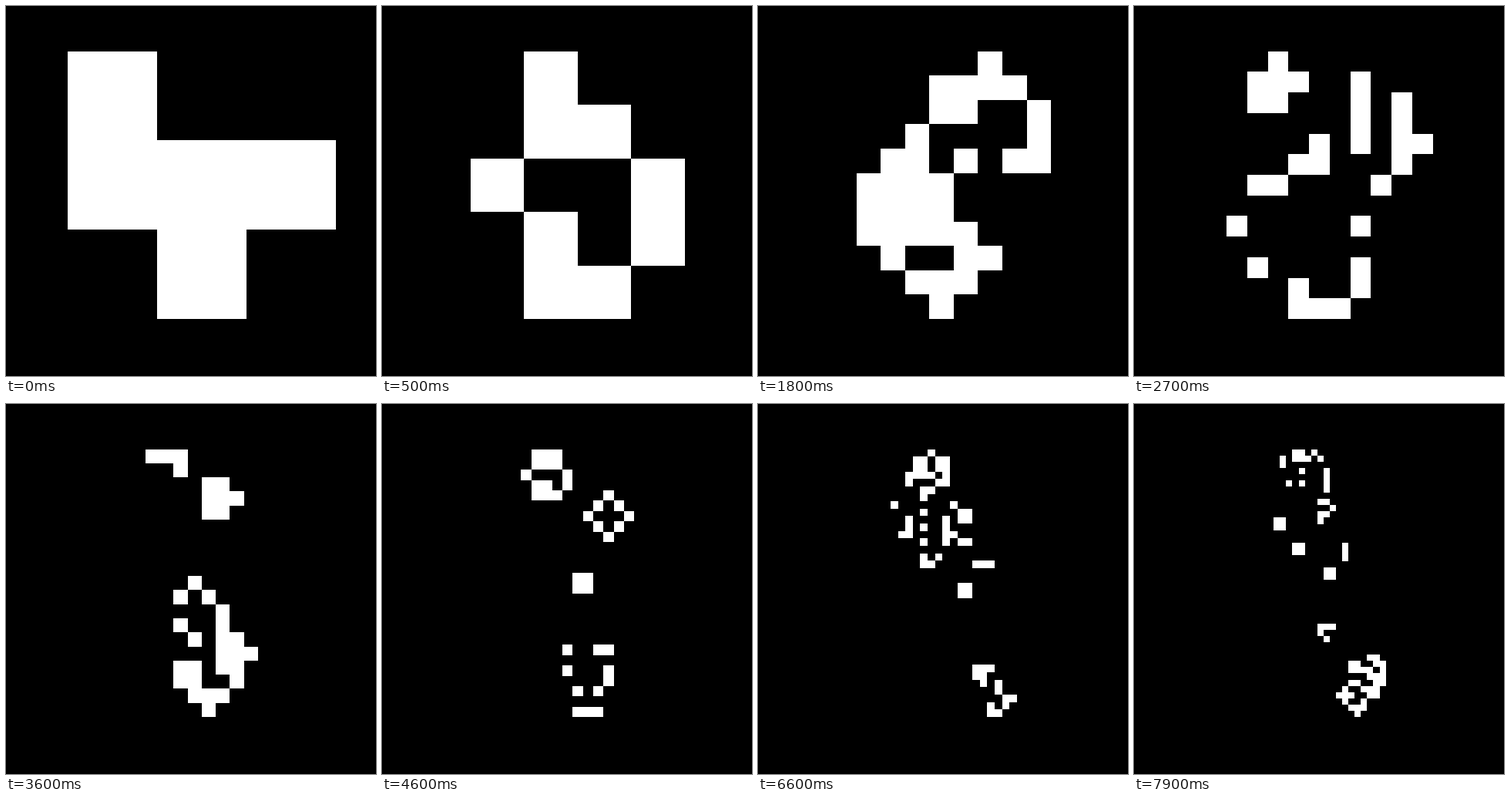
Recreate the animation shown at these times as an HTML page with a canvas. Size 480 px wide and 480 px high, loop 8000 ms.

```html
<!DOCTYPE html>
<html lang="en">
<head>
<meta charset="utf-8">
<title>Game of Life</title>
<style>
  html, body { margin: 0; width: 100%; height: 100%; overflow: hidden; background: #000; }
  canvas { display: block; width: 480px; height: 480px; }
</style>
</head>
<body>
<canvas id="stage" width="480" height="480"></canvas>
<script>
const STEP = 100, COUNT = 80;
const GRID = 256;
// The living cells always fill this height, centred on CENTER.
const TOP = 58.62, HEIGHT = 347.36, CENTER = 253.91;

const ctx = document.getElementById('stage').getContext('2d');
const around = [-GRID - 1, -GRID, -GRID + 1, -1, 1, GRID - 1, GRID, GRID + 1];

function parse(rows) {
  const cells = new Set();
  rows.forEach((row, y) => [...row].forEach((c, x) => {
    if (c === 'X') cells.add((GRID / 2 + y) * GRID + GRID / 2 + x);
  }));
  return cells;
}

function evolve(cells) {
  const sums = new Map();
  for (const cell of cells)
    for (const d of around) sums.set(cell + d, (sums.get(cell + d) || 0) + 1);
  const next = new Set();
  for (const [cell, n] of sums)
    if (n === 3 || (n === 2 && cells.has(cell))) next.add(cell);
  return next;
}

const generations = [parse(['X..', 'XXX', '.X.'])];
while (generations.length < COUNT) generations.push(evolve(generations.at(-1)));

function draw(cells) {
  const points = [...cells].map(c => [c % GRID, Math.floor(c / GRID)]);
  const xs = points.map(p => p[0]), ys = points.map(p => p[1]);
  const minX = Math.min(...xs), maxX = Math.max(...xs);
  const minY = Math.min(...ys), maxY = Math.max(...ys);
  const size = HEIGHT / (maxY - minY + 1);
  const left = CENTER - size * (maxX - minX + 1) / 2;
  const edgeX = x => Math.round(left + (x - minX) * size);
  const edgeY = y => Math.round(TOP + (y - minY) * size);

  ctx.fillStyle = '#000';
  ctx.fillRect(0, 0, 480, 480);
  ctx.fillStyle = '#fff';
  for (const [x, y] of points)
    ctx.fillRect(edgeX(x), edgeY(y), edgeX(x + 1) - edgeX(x), edgeY(y + 1) - edgeY(y));
}

const start = performance.now();
let shown = -1;

function tick() {
  const index = Math.floor((performance.now() - start) / STEP) % COUNT;
  if (index !== shown) draw(generations[shown = index]);
  requestAnimationFrame(tick);
}
tick();
</script>
</body>
</html>
```
